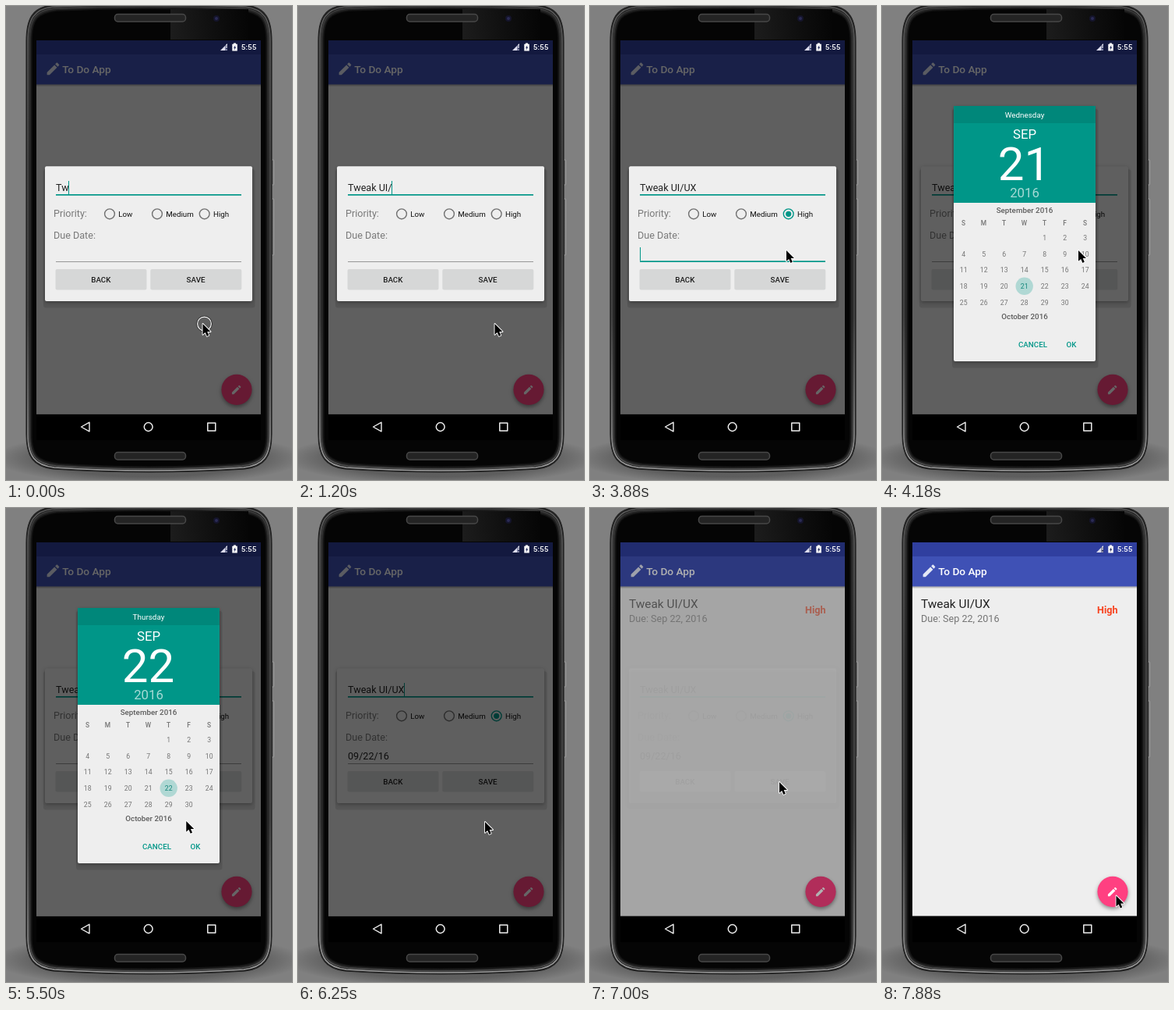
An HTML page with a canvas that plays this animation: 367x607 px, repeating every 8 s.

```html
<!DOCTYPE html>
<html lang="en">
<head>
<meta charset="utf-8">
<title>To Do App</title>
<style>
html, body { margin: 0; width: 100%; height: 100%; overflow: hidden; background: #808080; }
canvas { display: block; width: 367px; height: 607px; }
</style>
</head>
<body>
<canvas id="stage" width="367" height="607"></canvas>
<script>
const ctx = document.getElementById('stage').getContext('2d');
const LOOP = 8000;
const TEAL = '#009688';
const PENCIL = new Path2D('M3 17.25V21h3.75L17.81 9.94l-3.75-3.75L3 17.25zM20.71 7.04a1 1 0 0 0 0-1.41l-2.34-2.34a1 1 0 0 0-1.41 0l-1.83 1.83 3.75 3.75 1.83-1.83z');
const ARROW = new Path2D('M0 0V13.8L3.2 10.9L5.4 15.9L7.8 14.8L5.7 10H10Z');

const TICKS = [0];
for (const [start, n] of [[150, 4], [900, 1], [1200, 1], [1640, 1], [1940, 8], [3130, 7],
  [4180, 1], [4470, 8], [5650, 7], [6700, 8], [7880, 1]]) {
  for (let i = 0; i < n; i++) TICKS.push(start + i * 150 - (i > 6 ? 10 : 0));
}

// Pointer stops: time, x, y
const POINTER = [
  [0, 252.5, 407], [1790, 252.5, 407], [2090, 257, 444], [2390, 246.5, 300],
  [2690, 257, 267], [3130, 257, 267], [3580, 252, 313], [4330, 252, 313],
  [4620, 208, 359], [4920, 208, 359], [5500, 238, 413], [5650, 241, 437],
  [5800, 241, 440], [5950, 241, 440], [6250, 240, 402], [6550, 243, 351],
  [7000, 243, 351], [7600, 300.5, 496.5]
];
const CLICKS = [0, 2840, 3730, 4770, 5800, 6700, 7740];
const TYPED = [[0, 2], [150, 3], [300, 4], [450, 5], [600, 6], [900, 8], [1200, 9], [1640, 10], [1940, 11]];

function text(str, x, y, size, color, weight = 400, align = 'left') {
  ctx.font = `${weight} ${size}px Roboto, sans-serif`;
  ctx.textAlign = align;
  ctx.fillStyle = color;
  ctx.fillText(str, x, y);
}
const label = (str, x, y, size, color, weight) => text(str, x, y, size, color, weight, 'center');

function rect(x, y, w, h, color) {
  ctx.fillStyle = color;
  ctx.fillRect(x, y, w, h);
}

function round(x, y, w, h, r, fill, stroke, width = 1) {
  ctx.beginPath();
  ctx.roundRect(x, y, w, h, r);
  paint(fill, stroke, width);
}

function circle(x, y, r, fill, stroke, width = 1) {
  ctx.beginPath();
  ctx.arc(x, y, r, 0, 7);
  paint(fill, stroke, width);
}

function paint(fill, stroke, width) {
  if (fill) { ctx.fillStyle = fill; ctx.fill(); }
  if (stroke) { ctx.strokeStyle = stroke; ctx.lineWidth = width; ctx.stroke(); }
}

function icon(path, x, y, scale, color) {
  ctx.save();
  ctx.translate(x, y);
  ctx.scale(scale, scale);
  ctx.fillStyle = color;
  ctx.fill(path);
  ctx.restore();
}

const gradient = (x0, y0, x1, y1, colors) => {
  const g = ctx.createLinearGradient(x0, y0, x1, y1);
  colors.forEach((c, i) => g.addColorStop(i / (colors.length - 1), c));
  return g;
};

function floorShadow() {
  ctx.save();
  ctx.translate(183, 579);
  ctx.scale(1, .17);
  const g = ctx.createRadialGradient(0, 0, 140, 0, 0, 200);
  g.addColorStop(0, 'rgba(60,60,60,.5)');
  g.addColorStop(1, 'rgba(60,60,60,0)');
  circle(0, 0, 200, g);
  ctx.restore();
}

function body(inset) {
  const l = 26 + inset, r = 341 - inset, top = -3 + inset, bot = 598 - inset;
  ctx.beginPath();
  ctx.moveTo(l, 46);
  ctx.bezierCurveTo(l, 16, l + 8, top + 5, l + 32, top + 2);
  ctx.quadraticCurveTo(183, top - 3, r - 32, top + 2);
  ctx.bezierCurveTo(r - 8, top + 5, r, 16, r, 46);
  ctx.lineTo(r, 548);
  ctx.bezierCurveTo(r, 577, r - 9, bot - 8, r - 34, bot - 5);
  ctx.quadraticCurveTo(183, bot + 3, l + 34, bot - 5);
  ctx.bezierCurveTo(l + 9, bot - 8, l, 577, l, 548);
  ctx.closePath();
}

function phone() {
  rect(0, 0, 367, 607, '#808080');
  floorShadow();
  round(341, 197, 2.5, 32, 1, '#555', '#b5b5b5', .8);
  round(341, 247, 2.5, 72, 1, '#555', '#b5b5b5', .8);
  body(0);
  paint('#1c1c1c', '#262626', 1.2);
  body(2);
  paint(null, gradient(0, 0, 0, 598, ['#5c5c5c', '#4c4c4c', '#4c4c4c', '#a0a0a0']), 1.6);
  body(4);
  paint('#242424', gradient(0, 0, 0, 598, ['#3c3c3c', '#2c2c2c', '#2c2c2c', '#505050']), 1.5);
  body(7);
  paint('#050505', '#121212', 1.5);
  rect(211, 4, 100, 39, gradient(211, 20, 311, 8, ['#1c1c1c', '#101010', '#050505']));
  for (const y of [10.5, 571.5]) round(139.5, y, 91, 9.5, 4, '#242424', '#474747', 1.5);
  circle(270, 16, 4, '#15152b');
  circle(270, 16, 2, '#2a2a55');
  rect(39, 522, 288, 34, '#000');
  ctx.lineJoin = 'round';
  ctx.beginPath();
  ctx.moveTo(96.5, 539);
  ctx.lineTo(107, 533.2);
  ctx.lineTo(107, 544.8);
  ctx.closePath();
  paint(null, '#eee', 1.4);
  circle(182.7, 539, 5.4, null, '#eee', 1.5);
  ctx.strokeRect(258.8, 534, 10, 10);
}

function statusIcons() {
  ctx.beginPath();
  ctx.moveTo(275, 57);
  ctx.lineTo(284, 48);
  ctx.lineTo(284, 57);
  paint('#dde');
  rect(281.6, 50, 2.6, 7, '#1c2355');
  rect(282.4, 49.5, 1.2, 4.5, '#fff');
  rect(282.4, 55.3, 1.2, 1.5, '#fff');
  rect(290.3, 48.7, 6.5, 8.8, '#fff');
  rect(292, 47.5, 3, 1.5, '#fff');
  ctx.beginPath();
  ctx.moveTo(294.4, 50);
  ctx.lineTo(292, 53.8);
  ctx.lineTo(293.4, 53.8);
  ctx.lineTo(292.8, 56.8);
  ctx.lineTo(295.3, 52.6);
  ctx.lineTo(293.8, 52.6);
  paint('#1c2355');
  text('5:55', 301.8, 56, 9.9, '#fff', 500);
}

function page(itemAlpha) {
  rect(39, 44, 288, 478.5, '#eee');
  rect(39, 44, 288, 18, '#303f9f');
  rect(39, 62, 288, 38.5, '#3f51b5');
  rect(39, 100.5, 288, 3, gradient(0, 100.5, 0, 103.5, ['rgba(0,0,0,.3)', 'rgba(0,0,0,0)']));
  icon(PENCIL, 50, 70, .87, '#e4e8f6');
  text('To Do App', 72.3, 85.7, 13.7, '#fff', 500);
  faded(itemAlpha, item);
  ctx.save();
  ctx.shadowColor = 'rgba(0,0,0,.4)';
  ctx.shadowBlur = 5;
  ctx.shadowOffsetY = 2.5;
  circle(296, 491.3, 19.6, '#ff4081');
  ctx.restore();
  icon(PENCIL, 288, 483.8, .64, '#fff');
}

function item() {
  text('Tweak UI/UX', 50, 128, 15.4, '#212121');
  text('Due: Sep 22, 2016', 50, 146, 12.6, '#757575');
  text('High', 276, 135.3, 12.6, '#f8431f', 700);
}

function panel(x, y, w, h) {
  round(x - 2, y + 4, w + 5.5, h + 4.5, 3, 'rgba(0,0,0,.1)');
  ctx.save();
  ctx.shadowColor = 'rgba(0,0,0,.3)';
  ctx.shadowBlur = 4;
  ctx.shadowOffsetY = 1.5;
  round(x, y, w, h, 2, '#eee');
  ctx.restore();
}

function radio(x, name, on) {
  circle(x, 266.3, 6.4, null, on ? TEAL : '#717171', 1.4);
  if (on) circle(x, 266.3, 3.6, TEAL);
  text(name, x + 11.2, 270, 9.8, '#111');
}

function button(x, name, pressed) {
  round(x, 337, 117, 26.5, 2, pressed ? '#bfc1c1' : '#d6d7d7');
  label(name, x + 58.3, 353.8, 9.8, '#1d1d1d', 500);
}

function editor(t) {
  panel(50, 205.3, 266, 172.7);
  const stop = TYPED.filter(s => s[0] <= t).pop();
  const name = 'Tweak UI/UX'.slice(0, stop[1]);
  text(name, 64, 237, 12.6, '#212121');
  const blink = t < 2390 || (t < 3700 && Math.floor((t - 2390) / 500) % 2 === 1) || (t >= 6100 && t < 6850);
  if (blink) rect(Math.round(63.2 + ctx.measureText(name).width), 224, 1, 17, TEAL);
  rect(64, 241, 238, 1.7, TEAL);
  text('Priority:', 61, 270, 12.6, '#7a7a7a');
  text('Due Date:', 61, 298, 12.6, '#7a7a7a');
  if (t >= 2980 && t < 3280) circle(254.7, 266.3, 14, 'rgba(0,0,0,.1)');
  radio(133, 'Low', false);
  radio(194, 'Medium', false);
  radio(254.7, 'High', t >= 2980);
  const due = t >= 3880 && t < 4180;
  if (due) rect(64, 309, 1, 17, TEAL);
  rect(64, due ? 326.3 : 327, 238, due ? 1.7 : 1, due ? TEAL : '#979797');
  if (t >= 5950) text('09/22/16', 64, 321.8, 12.6, '#212121');
  button(63.5, 'BACK', false);
  button(185.3, 'SAVE', t >= 6700 && t < 7000);
}

function calendar(t) {
  const day = t >= 4920 ? 22 : 21;
  panel(92, 128, 182, 327);
  rect(92, 128, 182, 124, TEAL);
  rect(92, 128, 182, 22, '#00877a');
  label(day === 22 ? 'Thursday' : 'Wednesday', 183, 143, 9.9, '#fff');
  label('SEP', 183, 170, 16.8, '#fff');
  label(day, 182.5, 223, 60, '#fff');
  label('2016', 183, 245, 16.8, 'rgba(255,255,255,.65)');
  label('September 2016', 183, 264.5, 9.8, '#5c5c5c', 500);
  [...'SMTWTFS'].forEach((d, i) => label(d, 104.5 + 26 * i, 281.3, 8.4, '#757575', 500));
  for (let d = 1; d <= 30; d++) {
    const cell = d + 3;
    const x = 104.7 + 26 * (cell % 7), y = 297 + 20.6 * Math.floor(cell / 7);
    if (d === day) circle(x, y, 11.2, '#b0d8d4');
    label(d, x, y + 3.1, 8.7, d === day ? '#16877c' : '#757575');
  }
  label('October 2016', 183, 401.3, 9.8, '#5c5c5c', 500);
  if (t >= 5800) round(223, 421, 40, 25, 2, 'rgba(0,0,0,.1)');
  label('CANCEL', 193.5, 436.5, 9.8, TEAL, 500);
  label('OK', 243, 436.5, 9.8, TEAL, 500);
}

function pointer(t) {
  let i = 0;
  while (i < POINTER.length - 2 && POINTER[i + 1][0] <= t) i++;
  const [t0, x0, y0] = POINTER[i], [t1, x1, y1] = POINTER[i + 1];
  const k = Math.min(1, (t - t0) / (t1 - t0));
  const x = x0 + (x1 - x0) * k, y = y0 + (y1 - y0) * k;
  if (CLICKS.some(c => t >= c && t < c + 140)) {
    circle(x + 2, y, 9.6, null, '#222', 1.4);
    circle(x + 2, y, 8.9, null, '#fff', 1.1);
  }
  ctx.save();
  ctx.translate(x, y);
  ctx.strokeStyle = '#fff';
  ctx.lineWidth = 1.8;
  ctx.stroke(ARROW);
  ctx.fillStyle = '#000';
  ctx.fill(ARROW);
  ctx.restore();
}

function faded(alpha, draw, t) {
  if (alpha <= 0) return;
  ctx.globalAlpha = alpha;
  draw(t);
  ctx.globalAlpha = 1;
}

function render(t) {
  const closing = t >= 7000 && t < 7150;
  const dim = t < 7000 ? .6 : closing ? .307 : 0;
  const editAlpha = t < 7000 ? 1 : closing ? .05 : 0;
  const itemAlpha = t < 7000 ? 0 : closing ? .6 : 1;
  const calAlpha = t < 4030 || t >= 6250 ? 0 : t < 4180 ? .5 : t < 6100 ? 1 : .35;
  const covered = t >= 4030 && t < 6400;
  const shade = () => rect(39, 44, 288, 478.5, `rgba(0,0,0,${dim})`);

  phone();
  page(itemAlpha);
  if (covered) {
    editor(t);
    shade();
  } else {
    shade();
    faded(editAlpha, editor, t);
  }
  statusIcons();
  faded(calAlpha, calendar, t);
  pointer(t);
}

const begin = performance.now();
function tick() {
  const now = (performance.now() - begin) % LOOP;
  render(TICKS.filter(s => s <= now).pop());
  requestAnimationFrame(tick);
}
tick();
</script>
</body>
</html>
```
